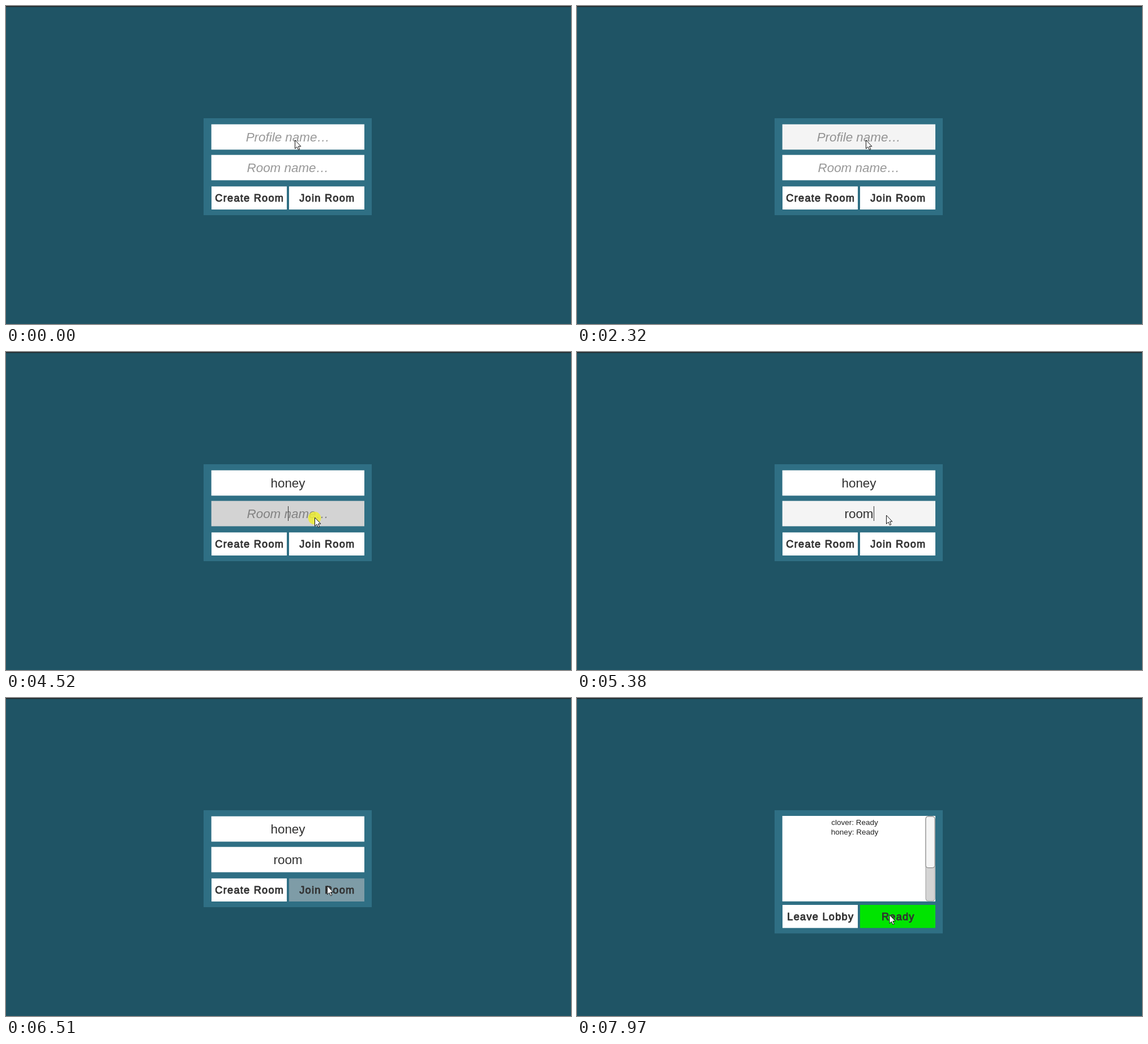
Write an HTML page with a canvas that moves like this. It is 998 px wide and 561 px high and loops after 8000 ms.

```html
<!DOCTYPE html>
<html>
<head>
<meta charset="utf-8">
<title>Join a room</title>
<style>
html, body { margin: 0; width: 998px; height: 561px; overflow: hidden; background: #1f5465; }
canvas { display: block; }
</style>
</head>
<body>
<canvas id="stage" width="998" height="561"></canvas>
<script>
const ctx = document.getElementById('stage').getContext('2d');
const INK = '#323232', PANEL = '#2f6f84', FONT = '"Liberation Sans", Arial, sans-serif';

// The picture advances in ticks; all times below are tick numbers.
const LOOP = 8000, TICK = 66.4, BLINK = 9, LOBBY = 104;
const clicks = { user: 8, room: 68, join: 97, ready: 119 };
const user = { text: 'honey', hint: 'Profile name…', keys: [43, 47, 50, 52, 53], focus: clicks.user, blur: clicks.room };
const room = { text: 'room', hint: 'Room name…', keys: [75, 78, 80, 81], focus: clicks.room, blur: clicks.join };
const HOST = 'clover';

// Cursor moves: start, end, target x, target y.
const moves = [
  [62, 67, 545.5, 292], [68, 70, 546.5, 288], [89, 96, 567.5, 331.5],
  [107, 110, 482, 373], [110, 112, 541, 379.5], [112, 117, 552, 382.5]
];

function cursorAt(k) {
  let x = 510.5, y = 236.5;
  for (const [from, to, tx, ty] of moves) {
    const p = Math.min(1, Math.max(0, (k - from) / (to - from)));
    const ease = p * p * (3 - 2 * p);
    x += (tx - x) * ease;
    y += (ty - y) * ease;
  }
  return [x, y];
}

function shade(k, hover, press, leave = Infinity) {
  if (k < hover || k >= leave) return '#fff';
  return k === press ? '#d3d3d3' : '#f4f4f4';
}

function box(x, y, w, h, fill) {
  ctx.fillStyle = fill;
  ctx.fillRect(x, y, w, h);
}

function label(text, x, y, font, fill = INK) {
  ctx.font = `${font} ${FONT}`;
  ctx.textAlign = 'center';
  ctx.fillStyle = fill;
  ctx.fillText(text, x, y);
}

function button(text, x, y, fill) {
  box(x, y, 133, 40.7, fill);
  ctx.letterSpacing = '1.25px';
  const cx = x + 67.3, base = y + 27;
  label(text, cx, base, '18.2px');
  ctx.strokeStyle = INK;
  ctx.lineWidth = 0.9;
  ctx.lineJoin = 'round';
  ctx.strokeText(text, cx, base);
  ctx.letterSpacing = '0px';
}

function field(k, y, { text, hint, keys, focus, blur }, fill) {
  const pressed = keys.filter(key => key <= k);
  const typed = text.slice(0, pressed.length);
  box(362.7, y, 270.3, 44.7, fill);
  if (typed) label(typed, 498, y + 30.3, '22.4px');
  else label(hint, 497.7, y + 30.3, 'italic 22.4px', 'rgba(50,50,50,.5)');

  const idle = k - (pressed.pop() ?? focus);
  if (k >= focus && k < blur && Math.floor(idle / BLINK) % 2 === 0) {
    const half = typed ? ctx.measureText(typed).width / 2 : 0;
    box(Math.round(498 + half), y + 9.3, 1, 26, INK);
  }
}

function drawForm(k) {
  box(349, 198, 297, 171, PANEL);
  field(k, 208.7, user, shade(k, 9, null, user.blur));
  field(k, 262.7, room, shade(k, 66, clicks.room, room.blur));
  button('Create Room', 363, 318.3, '#fff');
  button('Join Room', 500, 318.3, k > clicks.join ? '#7e9ca7' : shade(k, 96, clicks.join));
}

function pill(y, h, fill, line) {
  ctx.beginPath();
  ctx.roundRect(616, y, 16, h, 4);
  ctx.fillStyle = fill;
  ctx.fill();
  ctx.strokeStyle = line;
  ctx.lineWidth = 1;
  ctx.stroke();
}

function drawLobby(k) {
  box(349, 198, 297, 217.3, PANEL);
  box(362.7, 208, 270.3, 150.8, '#fff');
  pill(209, 149, '#d4d4d4', '#9a9a9a');
  pill(209, 90.5, '#f5f5f5', '#7c7c7c');
  label(`${HOST}: Ready`, 490.5, 224, '13.5px', '#222');
  label(`${user.text}: ${k < clicks.ready ? 'Not Ready' : 'Ready'}`, 490.5, 240.5, '13.5px', '#222');
  button('Leave Lobby', 363, 365, '#fff');
  button('Ready', 500, 365, k > clicks.ready ? '#00e400' : shade(k, 112, clicks.ready));
}

function drawCursor(k) {
  const [x, y] = cursorAt(k);
  if (Object.values(clicks).includes(k)) {
    ctx.beginPath();
    ctx.arc(x - 0.5, y + 1, 11.3, 0, Math.PI * 2);
    ctx.fillStyle = 'rgba(236,236,50,.85)';
    ctx.fill();
  }
  ctx.save();
  ctx.translate(x, y);
  const arrow = new Path2D('M0 0V15.2L3.5 12L6 17.3L8.3 16.3L5.9 11.1H10.4Z');
  ctx.fillStyle = '#fff';
  ctx.fill(arrow);
  ctx.strokeStyle = '#111';
  ctx.lineWidth = 1;
  ctx.lineJoin = 'miter';
  ctx.stroke(arrow);
  ctx.restore();
}

function draw(ms) {
  const k = Math.floor((ms % LOOP + 8) / TICK);
  box(0, 0, 998, 561, '#1f5465');
  box(0, 0, 998, 1.6, '#24292b');
  if (k < LOBBY) drawForm(k);
  else drawLobby(k);
  drawCursor(k);
}

const start = performance.now();
(function loop() {
  draw(performance.now() - start);
  requestAnimationFrame(loop);
})();
</script>
</body>
</html>
```
